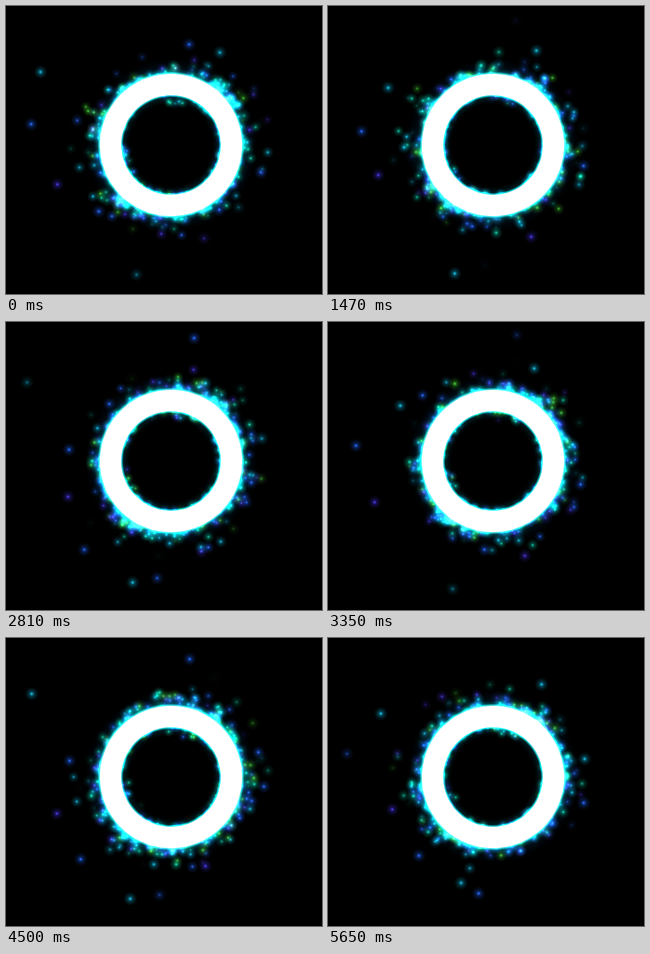
An HTML page with a canvas that plays this animation: 316 by 288 pixels, repeating every 5.67 s.

```html
<!DOCTYPE html>
<html lang="en">
<head>
<meta charset="utf-8">
<title>Glowing ring</title>
<style>
html, body { margin: 0; width: 100%; height: 100%; overflow: hidden; background: #000; }
canvas { display: block; width: 316px; height: 288px; }
</style>
</head>
<body>
<canvas id="stage" width="316" height="288"></canvas>
<script>
const ctx = document.getElementById('stage').getContext('2d');
const LOOP = 5670, STEP = 56.5;
const CX = 165, CY = 139, OUTER = 71, INNER = 49.5;
const TAU = Math.PI * 2, RAD = Math.PI / 180;

const COLORS = {
  cyan: [10, 165, 200],
  teal: [5, 190, 155],
  blue: [25, 85, 220],
  violet: [55, 40, 195],
  green: [55, 180, 40]
};

// Jets that fling single sparks far out: angle, reach, hue.
const JETS = [
  [211, 160, 'cyan'], [187, 146, 'blue'], [163, 128, 'violet'],
  [-81, 128, 'blue'], [-64, 107, 'cyan'], [-116, 92, 'green'],
  [106, 138, 'cyan'], [96, 118, 'blue'], [69, 100, 'violet'],
  [136, 122, 'blue'], [-13, 93, 'cyan'], [14, 94, 'blue']
];

function rand(a, b) {
  let h = Math.imul(a + 1, 374761393) ^ Math.imul(b + 7, 668265263);
  h = Math.imul(h ^ (h >>> 13), 1274126177);
  h = Math.imul(h ^ (h >>> 16), 2246822519);
  return ((h ^ (h >>> 15)) >>> 0) / 4294967296;
}

function pick(list, u) {
  return list[Math.floor(u * list.length)];
}

function makeSprite(rgb) {
  const c = document.createElement('canvas');
  c.width = c.height = 32;
  const g = c.getContext('2d');
  const grad = g.createRadialGradient(16, 16, 0, 16, 16, 16);
  const tint = a => `rgba(${rgb},${a})`;
  grad.addColorStop(0, `rgb(${rgb.map(v => v + 50)})`);
  grad.addColorStop(0.14, tint(0.85));
  grad.addColorStop(0.3, tint(0.4));
  grad.addColorStop(0.6, tint(0.17));
  grad.addColorStop(1, tint(0));
  g.fillStyle = grad;
  g.fillRect(0, 0, 32, 32);
  return c;
}

const sprites = {};
for (const hue in COLORS) sprites[hue] = makeSprite(COLORS[hue]);
const HUES = ['cyan', 'cyan', 'teal', 'teal', 'blue', 'blue', 'violet', 'green'];

function dot(hue, angle, r, size, alpha) {
  ctx.globalAlpha = Math.max(0, Math.min(1, alpha));
  const x = CX + Math.cos(angle) * r, y = CY + Math.sin(angle) * r;
  ctx.drawImage(sprites[hue], x - size, y - size, size * 2, size * 2);
}

// Runs one endlessly reborn spark: p is its age from 0 to 1, n(k) its own random numbers.
function live(id, t, life, paint) {
  const clock = t / (life * (0.75 + 0.5 * rand(id, 1))) + rand(id, 2);
  const turn = Math.floor(clock), p = clock - turn;
  const fade = Math.min(1, p * 7, (1 - p) * 4);
  paint(p, k => rand(id * 31 + turn, k), fade);
}

// Angles gather around the upper right to lower left diagonal.
function diagonal(u, v) {
  const spread = (u * 2 - 1) * Math.abs(u * 2 - 1) * 90;
  return ((v < 0.5 ? -52 : 128) + spread) * RAD;
}

function drawRim(t) {
  for (let i = 0; i < 250; i++) {
    live(i, t, 1250, (p, n, fade) => {
      const reach = Math.min(32, 1 - Math.log(1 - n(3)) * 9.5);
      const angle = n(4) < 0.4 ? n(5) * TAU : diagonal(n(5), n(6));
      const r = OUTER - 1 + reach * (0.35 + 0.65 * p);
      dot(pick(HUES, n(8)), angle + (n(7) - 0.5) * 0.12 * p, r, 5.5 + n(9) * 1.5, fade * (0.65 + 0.35 * n(10)));
    });
  }
}

function drawInside(t) {
  for (let i = 0; i < 60; i++) {
    live(1000 + i, t, 1100, (p, n, fade) => {
      const loose = i < 9;
      const angle = loose ? (i % 2 ? 155 : -78) * RAD + (n(3) - 0.5) * 0.7 : n(3) * TAU;
      const depth = loose ? 3 + n(4) * 8 : n(4) * 3;
      dot(pick(HUES, n(5)), angle, INNER + 1 - depth * (0.4 + 0.6 * p), 5.5, fade * 0.8);
    });
  }
}

function drawJets(t) {
  JETS.forEach(([deg, reach, hue], i) => {
    live(2000 + i, t, 1700, (p, n, fade) => {
      const ease = 1 - (1 - p) ** 3;
      const r = OUTER + (reach - OUTER) * ease * (0.94 + 0.12 * n(3));
      dot(hue, (deg + (n(4) - 0.5) * 6) * RAD, r, 7, fade);
    });
  });
}

function drawRing() {
  const from = 41, to = 86;
  const grad = ctx.createRadialGradient(CX, CY, from, CX, CY, to);
  const stop = (r, color) => grad.addColorStop((r - from) / (to - from), color);
  stop(from, 'rgba(0,50,70,0)');
  stop(INNER - 2, 'rgba(0,110,125,.25)');
  stop(INNER - 0.5, 'rgba(0,235,240,.8)');
  stop(INNER + 0.8, '#fff');
  stop(OUTER - 0.5, '#fff');
  stop(OUTER + 1, 'rgba(30,245,245,.8)');
  stop(OUTER + 2.5, 'rgba(0,150,170,.4)');
  stop(OUTER + 6, 'rgba(0,65,105,.18)');
  stop(to, 'rgba(0,40,90,0)');
  ctx.globalAlpha = 1;
  ctx.fillStyle = grad;
  ctx.beginPath();
  ctx.arc(CX, CY, to, 0, TAU);
  ctx.arc(CX, CY, from, 0, TAU, true);
  ctx.fill();
}

function draw(t) {
  ctx.globalCompositeOperation = 'source-over';
  ctx.globalAlpha = 1;
  ctx.fillStyle = '#000';
  ctx.fillRect(0, 0, 316, 288);
  ctx.globalCompositeOperation = 'lighter';
  drawJets(t);
  drawRim(t);
  drawInside(t);
  drawRing();
}

function frame() {
  const t = performance.now() % LOOP;
  draw(Math.floor(t / STEP + 0.1) * STEP);
  requestAnimationFrame(frame);
}
frame();
</script>
</body>
</html>
```
